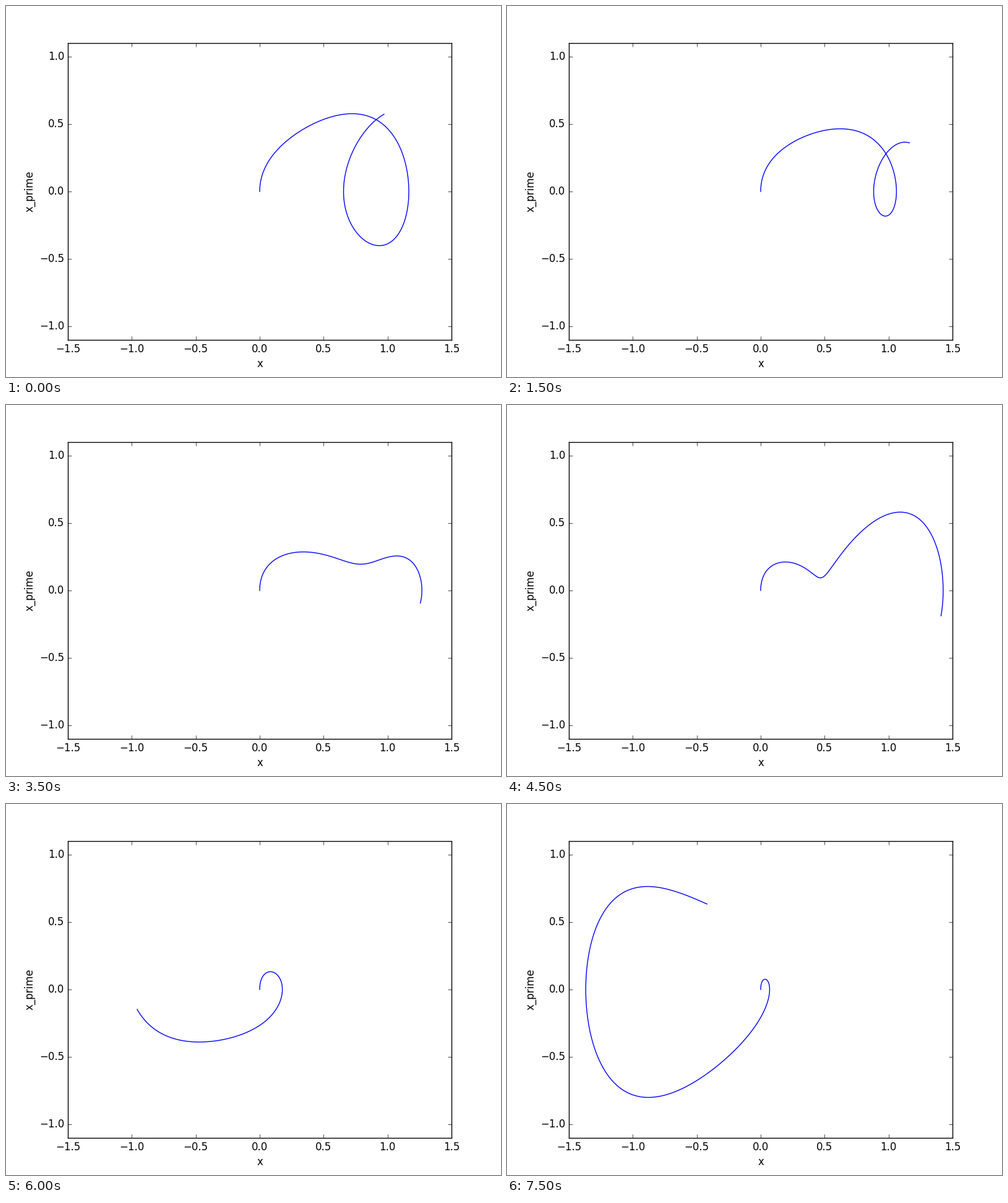
These frames come from a looping animation (800 by 600 pixels, 8000 ms). A matplotlib script:

```python
import numpy as np
import matplotlib.pyplot as plt
from matplotlib.animation import FuncAnimation

plt.style.use("classic")
plt.rcParams["font.family"] = "DejaVu Sans"

FRAMES, INTERVAL = 16, 500
PHASE_STEP = 2 * np.pi / 100
STEPS = 600
DAMPING, DRIVE = 0.25, 0.4


def duffing(state, t, phase):
    x, v = state
    return np.array([v, x - x**3 - DAMPING * v + DRIVE * np.cos(t + phase)])


def trajectories(phases):
    """RK4 over one drive period, from rest, for all phases at once."""
    h = 2 * np.pi / STEPS
    path = np.zeros((STEPS + 1, 2, len(phases)))
    for i in range(STEPS):
        s, t = path[i], i * h
        k1 = duffing(s, t, phases)
        k2 = duffing(s + h / 2 * k1, t + h / 2, phases)
        k3 = duffing(s + h / 2 * k2, t + h / 2, phases)
        k4 = duffing(s + h * k3, t + h, phases)
        path[i + 1] = s + h / 6 * (k1 + 2 * k2 + 2 * k3 + k4)
    return path


paths = trajectories(PHASE_STEP * np.arange(FRAMES))

fig = plt.figure(figsize=(8, 6), dpi=100, facecolor="white")
ax = fig.add_axes([0.125, 0.1, 0.775, 0.8])
ax.set(xlim=(-1.5, 1.5), ylim=(-1.1, 1.1), xlabel="x", ylabel="x_prime",
       xticks=np.arange(-1.5, 1.6, 0.5), yticks=np.arange(-1, 1.1, 0.5))
line, = ax.plot([], [], color="blue", lw=1)


def update(frame):
    line.set_data(paths[:, 0, frame], paths[:, 1, frame])
    return line,


anim = FuncAnimation(fig, update, frames=FRAMES, interval=INTERVAL,
                     repeat=True, repeat_delay=0)
plt.show()
```
